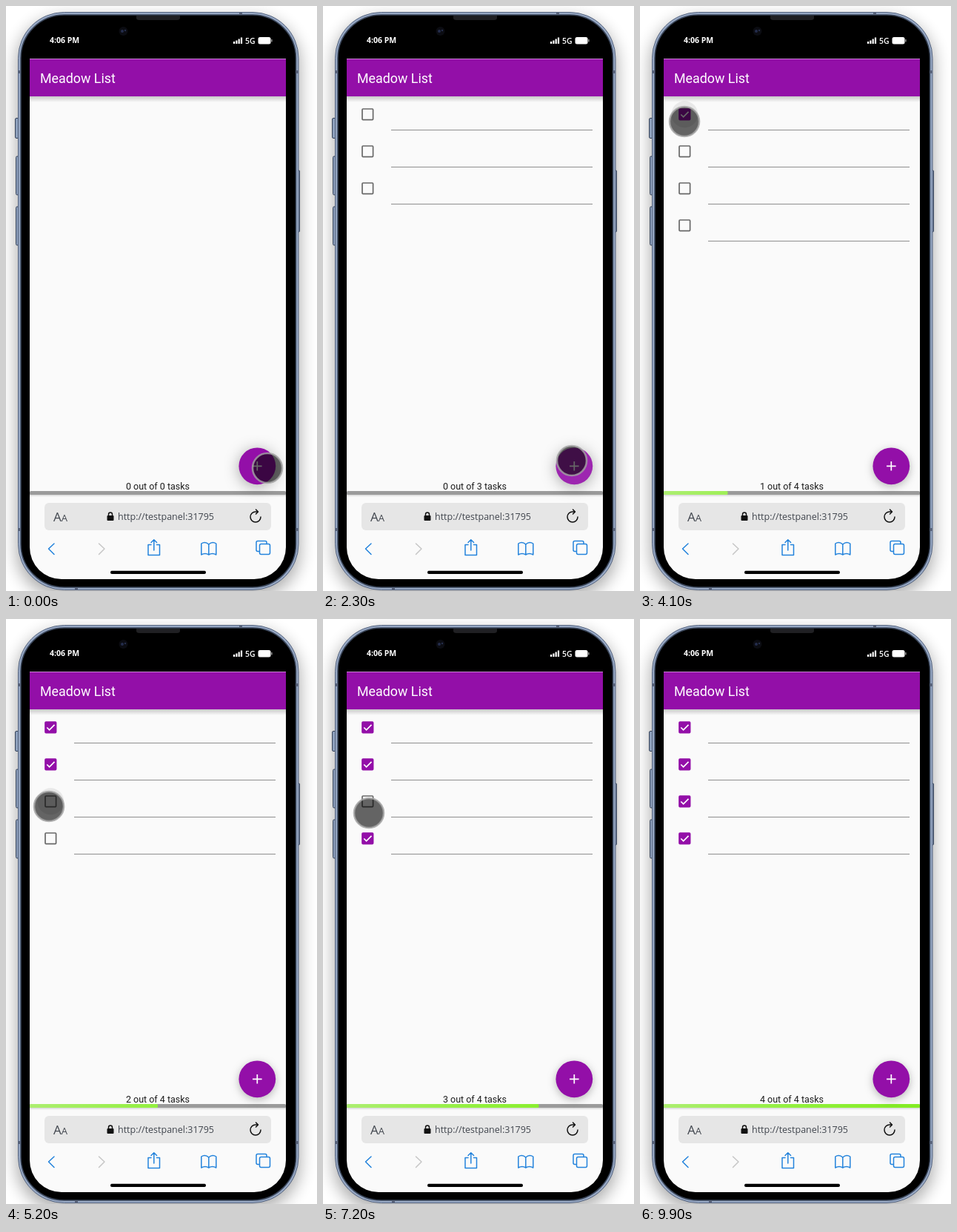
An HTML page that plays this animation: 420 by 790 pixels, repeating every 10000 ms.

```html
<!DOCTYPE html>
<html lang="en">
<head>
<meta charset="utf-8">
<title>Task list</title>
<style>
  html, body { margin: 0; width: 100%; height: 100%; overflow: hidden; background: #fff; }
  svg { display: block; width: 420px; height: 790px; }
  .ui { font-family: Roboto, sans-serif; }
  .sys { font-family: "Open Sans", "Noto Sans", sans-serif; }
  .line { fill: none; stroke-width: 1.5; stroke-linecap: round; stroke-linejoin: round; }
  .blue { stroke: #2383dc; }
</style>
</head>
<body>
<svg viewBox="0 0 420 790">
  <defs>
    <linearGradient id="green" gradientUnits="userSpaceOnUse" x1="32" x2="378" y1="0" y2="0">
      <stop stop-color="#acee70"/><stop offset=".55" stop-color="#90f03a"/><stop offset="1" stop-color="#82ec22"/>
    </linearGradient>
    <linearGradient id="shade" x2="0" y2="1">
      <stop stop-color="#000" stop-opacity=".2"/><stop offset="1" stop-color="#000" stop-opacity="0"/>
    </linearGradient>
    <filter id="soft" x="-20%" y="-20%" width="140%" height="140%"><feGaussianBlur stdDeviation="11"/></filter>
    <clipPath id="screen"><path d="M32 71H378V731A43 43 0 0 1 335 774H75A43 43 0 0 1 32 731Z"/></clipPath>
  </defs>

  <!-- phone body -->
  <rect x="14" y="16" width="383" height="782" rx="62" opacity=".32" filter="url(#soft)"/>
  <g fill="#8ea0bd" stroke="#37445a">
    <rect x="12.500" y="151.500" width="5" height="27" rx="1.500"/>
    <rect x="13.500" y="203" width="4" height="52" rx="1.500"/>
    <rect x="13.500" y="271" width="4" height="52" rx="1.500"/>
    <rect x="394" y="222" width="2.500" height="83" rx="1"/>
  </g>
  <rect x="16.500" y="8.500" width="378.500" height="780" rx="62" fill="#97a8c4" stroke="#566580"/>
  <rect x="20" y="12" width="371.500" height="773" rx="58.500" fill="#000" stroke="#3b475b" stroke-width="1.500"/>
  <path d="M17 89H20M17 707H20M391.500 89H394.500M391.500 707H394.500M95 785.500V788M317 9V11.500" stroke="#566077" stroke-width="4"/>
  <path d="M176 13H235V16Q235 19 231 19H180Q176 19 176 16Z" fill="#202023"/>
  <circle cx="158.500" cy="34" r="6" fill="#0b0c12"/>
  <circle cx="157" cy="34" r="2" fill="#242d4c"/><circle cx="161" cy="33" r="1.200" fill="#26304d"/>

  <!-- status bar -->
  <g class="sys" fill="#fff" font-size="10.500">
    <text x="59" y="50" font-weight="700">4:06 PM</text>
    <text x="323" y="50.500" font-weight="600">5G</text>
    <path d="M307 48h2.200v3h-2.200zM310.300 46.500h2.200v4.500h-2.200zM313.600 44.500h2.200v6.500h-2.200zM316.900 42.500h2.200v8.500h-2.200z"/>
    <rect x="340.500" y="42" width="17" height="9.500" rx="2.500"/>
    <rect x="358.300" y="45" width="1.200" height="3.500" rx=".6" opacity=".7"/>
  </g>

  <!-- app -->
  <g clip-path="url(#screen)">
    <rect x="32" y="71" width="346" height="704" fill="#fafafa"/>
    <rect x="32" y="122" width="346" height="8" fill="url(#shade)"/>
    <rect x="32" y="71" width="346" height="51" fill="#930fa8"/>
    <path d="M32 71.500H378" stroke="#c77fd2"/>
    <text class="ui" x="46" y="103.500" font-size="17.850" fill="#fff">Meadow List</text>
    <g id="rows"></g>
    <text id="count" class="ui" x="205" y="652.500" font-size="12.500" text-anchor="middle" fill="#1b1b1b"></text>
    <rect x="32" y="659" width="346" height="4" fill="url(#shade)"/>
    <rect x="32" y="655" width="346" height="5" rx="1.500" fill="#9b9b9b"/>
    <rect id="bar" x="32" y="655" height="5" rx="1.500" fill="url(#green)"/>
    <g id="fab">
      <circle cx="339.300" cy="621.300" r="24.900" fill="#930fa8"/>
      <circle id="ripple" cx="339.300" cy="621.300" r="24.900" fill="#fff"/>
      <path d="M333 621.300H345.600M339.300 615V627.600" stroke="#fff" stroke-width="1.700"/>
    </g>

    <!-- browser controls -->
    <rect x="52" y="671" width="306" height="37" rx="6" fill="#e6e6e6"/>
    <g class="sys" fill="#41464e">
      <text x="64" y="696" font-size="17">A<tspan font-size="13">A</tspan></text>
      <text x="151" y="694" font-size="12.500">http://testpanel:31795</text>
    </g>
    <rect x="136.500" y="688" width="9" height="7" rx="1" fill="#111"/>
    <path class="line" d="M138.500 688V686.500A2.500 2.500 0 0 1 143.500 686.500V688" stroke="#111"/>
    <path class="line" d="M344 690A7 7 0 1 1 337 683H340M337.500 680L340.500 683L337.500 686" stroke="#111"/>
    <path class="line blue" d="M65 726L57.500 733L65 740.500"/>
    <path class="line" d="M125.500 726L133 733L125.500 740.500" stroke="#c6c6c6"/>
    <path class="line blue" d="M196 727.500H192V741.500H207.500V727.500H203.500M199.800 735V721M196 724.500L199.800 720.700L203.600 724.500"/>
    <path class="line blue" d="M273.800 727Q269 722.500 263.800 726V741Q269 738 273.800 741Q278.600 738 283.800 741V726Q278.600 722.500 273.800 727V741"/>
    <g class="line blue">
      <path d="M342 736.500H340Q338 736.500 338 734.500V724.500Q338 722.500 340 722.500H350Q352 722.500 352 724.500V726.500"/>
      <rect x="342.500" y="726.500" width="14" height="14" rx="2"/>
    </g>
    <rect x="141" y="762.700" width="129" height="4.300" rx="2"/>
  </g>

  <g id="cursor">
    <circle r="20" fill="#000" fill-opacity=".6"/>
    <circle r="20" fill="none" stroke="#a6a6a6" stroke-opacity=".8" stroke-width="2.600"/>
  </g>
</svg>
<script>
const $ = id => document.getElementById(id);
const LOOP = 10000, STEP = 100;
const adds = [600, 1300, 2100, 2900];
const checks = [4000, 4700, 7900, 6100];
const rowY = i => 146.3 + i * 50;

// time, x, y
const path = [
  [0, 353, 624], [500, 345, 620], [2300, 336, 614], [3000, 337, 616],
  [3800, 62, 152], [4100, 60, 156], [4500, 59, 204], [4800, 59, 204],
  [5200, 58, 253], [5800, 60, 303], [6400, 60, 303], [7000, 62, 262],
  [7300, 62, 262], [7800, 62, 255], [LOOP, 62, 255]
];

const rows = adds.map((_, i) => {
  const g = document.createElementNS("http://www.w3.org/2000/svg", "g");
  g.setAttribute("transform", `translate(60.300 ${rowY(i)})`);
  g.innerHTML = `<path d="M31.700 21.200H303.700" stroke="#8e8e8e"/>
    <circle r="18"/>
    <rect x="-7.300" y="-7.300" width="14.600" height="14.600" rx="1" stroke-width="1.700"/>
    <path d="M-5 .2L-1.700 3.500L5.200 -3.400" fill="none" stroke="#fff" stroke-width="1.700"/>`;
  $("rows").append(g);
  return g;
});

function cursorAt(t) {
  const i = path.findIndex(p => p[0] > t);
  const [t0, x0, y0] = path[i - 1], [t1, x1, y1] = path[i];
  const k = (t - t0) / (t1 - t0), e = k * k * (3 - 2 * k);
  return [x0 + (x1 - x0) * e, y0 + (y1 - y0) * e];
}

function draw(t) {
  const [x, y] = cursorAt(t);
  const fade = Math.max(0, Math.min(1, (9300 - t) / 300));
  const near = (cx, cy, r) => fade > 0 && Math.hypot(x - cx, y - cy) < r;
  const total = adds.filter(a => t >= a).length;
  const done = checks.filter(c => t >= c).length;

  rows.forEach((g, i) => {
    const on = t >= checks[i];
    const [, halo, box, tick] = g.children;
    g.style.display = i < total ? "" : "none";
    halo.style.opacity = near(60.3, rowY(i), 14) ? 0.07 : 0;
    box.style.fill = on ? "#930fa8" : "none";
    box.style.stroke = on ? "#930fa8" : "#686868";
    tick.style.display = on ? "" : "none";
  });

  $("count").textContent = `${done} out of ${total} tasks`;
  $("bar").setAttribute("width", total ? 346 * done / total : 0);

  const age = Math.min(...adds.filter(a => t >= a).map(a => t - a), 600);
  $("ripple").style.opacity = 0.14 * (1 - age / 600);
  $("fab").style.filter = near(339.3, 621.3, 25)
    ? "drop-shadow(0 3px 10px #0005)" : "drop-shadow(0 3px 6px #0004)";

  $("cursor").setAttribute("transform", `translate(${x} ${y})`);
  $("cursor").style.opacity = fade;
}

const start = performance.now();
function tick() {
  const t = (performance.now() - start) % LOOP;
  draw(Math.floor(t / STEP) * STEP);
  requestAnimationFrame(tick);
}
tick();
</script>
</body>
</html>
```
